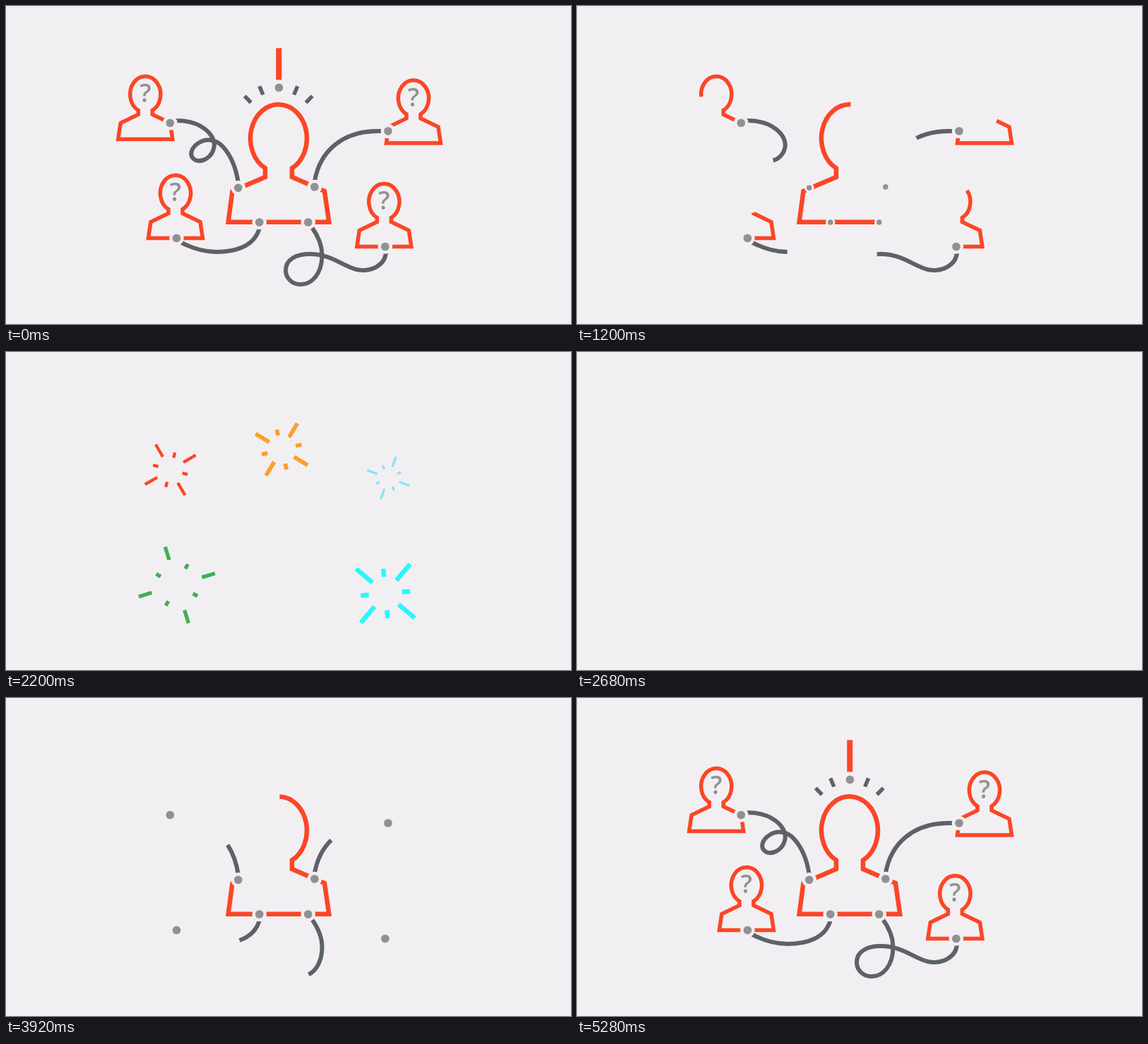
Animation, 800 px wide and 450 px high, one loop 5320 ms. Source, as an HTML page:

```html
<!DOCTYPE html>
<html lang="en">
<head>
<meta charset="utf-8">
<title>Connected people</title>
<style>
  html, body { margin: 0; width: 100%; height: 100%; overflow: hidden; background: #f2eff2; }
  svg { display: block; width: 100%; height: 100%; }
  text { font: 600 36px "Open Sans", sans-serif; fill: #929193; text-anchor: middle; }
</style>
</head>
<body>
<svg id="stage" viewBox="0 0 800 450"></svg>
<script>
const LOOP = 5320;
const BG = '#f2eff2', ORANGE = '#fb4626', SLATE = '#5d6268', GRAY = '#919092';
const stage = document.getElementById('stage');
const updaters = [];

function set(node, attrs) {
  for (const key in attrs) node.setAttribute(key, attrs[key]);
}

function add(tag, attrs, parent = stage) {
  const node = document.createElementNS('http://www.w3.org/2000/svg', tag);
  set(node, attrs);
  return parent.appendChild(node);
}

// Smooth ease from 0 to 1
function progress(t, start, duration) {
  const x = Math.min(1, Math.max(0, (t - start) / duration));
  return x * x * (3 - 2 * x);
}

// Visible part of a shape: erased from its beginning, later drawn from its beginning.
function span(t, { out, outTime, back, backTime = outTime }) {
  return t < back ? [progress(t, out, outTime), 1] : [0, progress(t, back, backTime)];
}

function trimmed(d, color, width, timing) {
  const path = add('path', { d, fill: 'none', stroke: color, 'stroke-width': width, pathLength: 1 });
  updaters.push(t => {
    const [a, b] = span(t, timing);
    set(path, {
      visibility: b - a < 0.0005 ? 'hidden' : 'visible',
      'stroke-dasharray': b - a > 0.9999 ? 'none' : `0 ${a} ${b - a} 2`
    });
  });
}

function dot(x, y, out, back) {
  const node = add('circle', { r: 8.1, fill: GRAY, stroke: BG, 'stroke-width': 4.5 });
  updaters.push(t => {
    const size = t < back ? 1 - progress(t, out, 160) : progress(t, back, 160);
    node.setAttribute('transform', `translate(${x} ${y}) scale(${size})`);
  });
}

function burst(x, y, start, { color, radius, angle }) {
  const group = add('g', { stroke: color, 'stroke-width': radius * 0.09 });
  const rays = Array.from({ length: 8 }, (_, i) =>
    add('line', { transform: `translate(${x} ${y}) rotate(${angle + 45 * i})` }, group));
  updaters.push(t => {
    const head = progress(t, start, 450), tail = progress(t, start + 240, 300);
    group.setAttribute('visibility', head - tail > 0.002 ? 'visible' : 'hidden');
    rays.forEach((ray, i) => {
      const reach = i % 2 ? 0.26 : 0.68;
      set(ray, { x1: radius * (0.32 + reach * tail), x2: radius * (0.32 + reach * head) });
    });
  });
}

// A joint shrinks away, then goes off as a burst.
function joint(x, y, start, back, spark) {
  dot(x, y, start - 155, back);
  burst(x + 0.4, y + 1.2, start, spark);
}

// Clockwise outline around the centre of the head; it may begin at any corner.
const BASE = 1, LEFT_SIDE = 3, RIGHT_SHOULDER = 9, HEAD_END = 7;
const OUTLINE = [[38.5, 63.5], [1.5, 63.5], [-38.5, 63.5], [-36, 46.5], [-35, 40.5],
  [-10, 28.5], [-10, 22.6], [10, 22.6], [10, 28.5], [35, 40.5]];

function outlineFrom(cx, cy, first) {
  return OUTLINE.concat([0]).map((_, i) => {
    const k = (first + i) % OUTLINE.length, [x, y] = OUTLINE[k];
    return (i === 0 ? 'M' : k === HEAD_END ? 'A21.6 25.5 0 1 1 ' : 'L') + `${cx + x} ${cy + y}`;
  }).join('');
}

function question(cx, cy, out) {
  const id = 'wipe' + cx;
  const box = add('rect', { x: cx - 20, width: 40 }, add('clipPath', { id }));
  const group = add('g', { 'clip-path': `url(#${id})` });
  add('text', { x: cx, y: cy + 11.3 }, group).textContent = '?';
  updaters.push(t => {
    const [a, b] = span(t, { out, outTime: 480, back: 4790, backTime: 420 });
    set(box, { y: cy - 16.5 + 29 * a, height: 29 * (b - a) });
  });
}

function person({ cx, cy, first, out = 465, back, wipe, start = 1880, dotBack = 3600, spark }) {
  const [x, y] = OUTLINE[first];
  trimmed(outlineFrom(cx, cy, first), ORANGE, 5.5, { out, outTime: 1350, back, backTime: 1000 });
  question(cx, cy, wipe);
  joint(cx + x, cy + y, start, dotBack, spark);
}

// Connecting lines, each from the centre figure outwards
const looped = { out: 465, outTime: 1350 };
const plain = { out: 555, outTime: 1150, backTime: 1350 };
trimmed('M329 251C326 230 318 211 307 199C298 189 284 187 274 193C262 200 258 212 268 218' +
  'C278 222 292 214 294.5 200C298 182 274 160 238 162.5', SLATE, 6, { ...looped, back: 3541 });
trimmed('M437 248C444 207 475 175 533 177', SLATE, 6, { ...plain, back: 3333 });
trimmed('M359 314C352 340 325 348 298 348C278 348 262 342 248 334.5', SLATE, 6, { ...plain, back: 3401 });
trimmed('M433 313C443 327 448 340 447.5 354C447 378 434 394 417 394C404 394 396 384 396 374' +
  'C396 358 412 351 430 351C461 351 476 368 497 373C518 377 538 366 538 347', SLATE, 6, { ...looped, back: 3441 });

// Centre figure
trimmed('M387.5 139.4A40 48 0 0 1 405 229.6V242L451 262L457.3 305.7H314.7L320.5 262L367 242V229.6' +
  'A40 48 0 0 1 387.5 139.4', ORANGE, 6.5, { out: 564, outTime: 1424, back: 2790, backTime: 1740 });
joint(328.8, 257.3, 1292, 3560, { color: '#2187bd', radius: 21, angle: 15 });
joint(436.9, 256, 1292, 3240, { color: ORANGE, radius: 45, angle: -28 });
joint(358.8, 306, 1292, 3437, { color: '#f9c233', radius: 48, angle: 18 });
joint(427.8, 306, 1292, 3405, { color: '#ee6a9d', radius: 23, angle: 30 });
burst(390.3, 138, 1970, { color: '#f9a02c', radius: 64, angle: 31 });

// Surrounding figures
person({ cx: 197.3, cy: 125, first: RIGHT_SHOULDER, back: 4078, wipe: 385,
  spark: { color: ORANGE, radius: 48, angle: -30 } });
person({ cx: 577, cy: 130.5, first: LEFT_SIDE, back: 4078, wipe: 305, dotBack: 3240,
  spark: { color: '#88e4f4', radius: 37, angle: 20 } });
person({ cx: 240, cy: 265, first: BASE, out: 321, back: 4163, wipe: 305, start: 1820,
  spark: { color: '#3cb155', radius: 59, angle: -17 } });
person({ cx: 535.4, cy: 277, first: BASE, back: 4243, wipe: 545, start: 1939,
  spark: { color: '#2cf6fd', radius: 73, angle: 40 } });

// Exclamation mark with four rays fanned around the head
const alert = { out: 705, outTime: 450, back: 4570 };
trimmed('M386.3 59.5V104.5', ORANGE, 8, alert);
for (const degrees of [-44, -23, 23, 44]) {
  const sin = Math.sin(degrees * Math.PI / 180), cos = Math.cos(degrees * Math.PI / 180);
  const at = r => `${385.8 + r * sin} ${177 - r * cos}`;
  trimmed(`M${at(56)}L${at(69)}`, SLATE, 5.5, alert);
}
dot(386.5, 115.5, 725, 4570);

const origin = performance.now();
function frame() {
  const t = (performance.now() - origin) % LOOP;
  updaters.forEach(update => update(t));
  requestAnimationFrame(frame);
}
frame();
</script>
</body>
</html>
```
